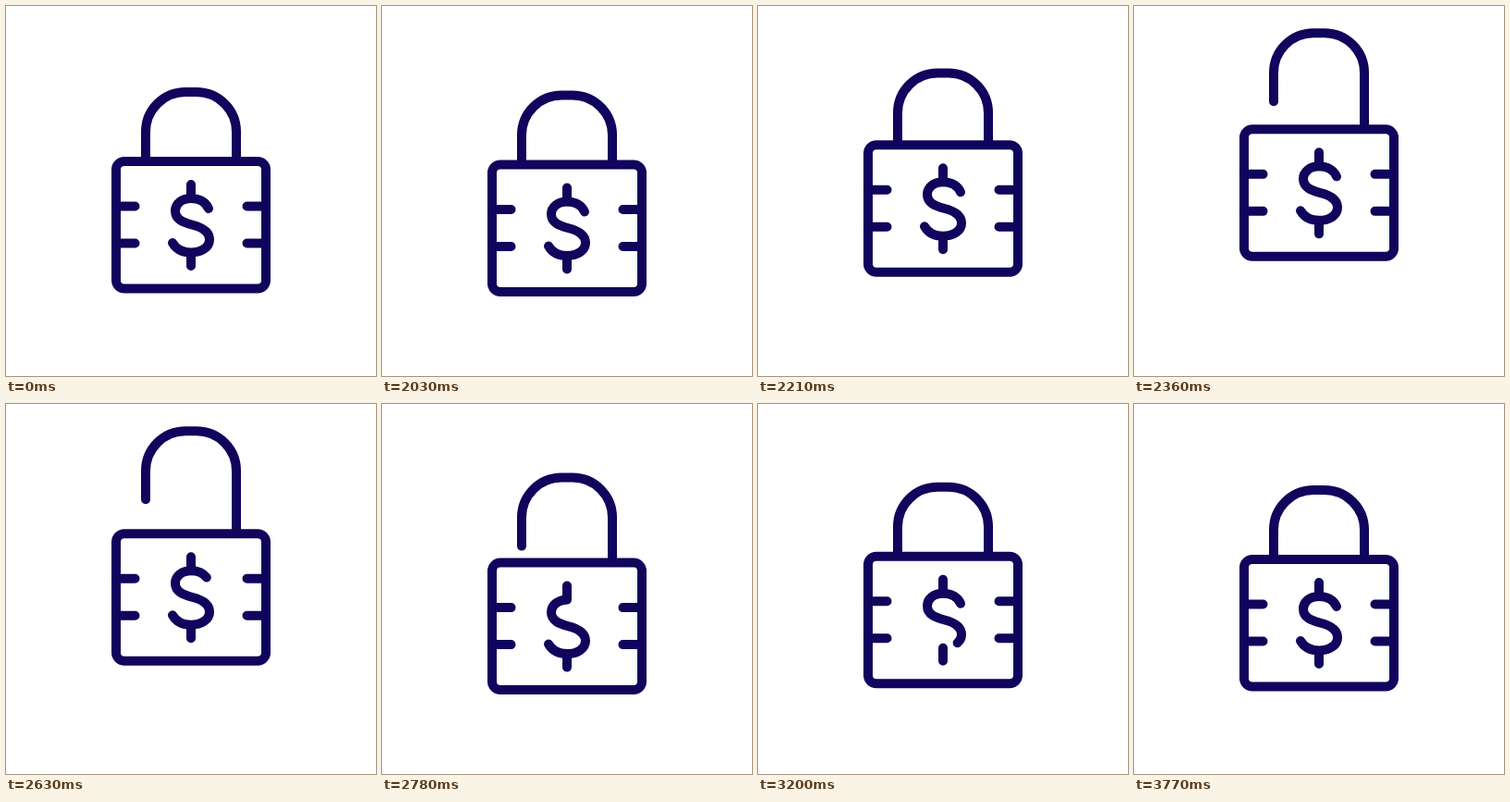
An HTML page that plays this animation: 400x400 px, repeating every 3890 ms.

```html
<!DOCTYPE html>
<html lang="en">
<head>
<meta charset="utf-8">
<title>Padlock</title>
<style>
  html, body { margin: 0; height: 100%; overflow: hidden; background: #fff; }
  svg { display: block; width: 100%; height: 100%; }
  g { fill: none; stroke: #10045c; stroke-width: 10; stroke-linecap: round; stroke-linejoin: round; }
</style>
</head>
<body>
<svg viewBox="0 0 400 400">
  <defs>
    <path id="curve" pathLength="1" d="M219 219C216 212 209 208 200 208C190 208 183 214 183 221.5C183 231 192 234 201 236.5C211 239 220 243 220 252.5C220 261 211 266.5 200 266.5C191 266.5 184 263 180 256"/>
  </defs>
  <g id="lock">
    <path id="shackle"/>
    <rect x="119" y="168" width="162" height="137.5" rx="9" fill="#fff"/>
    <path d="M119 216.5h20.5M119 256.5h20.5M281 216.5h-20.5M281 256.5h-20.5M200 193v15M200 267v14"/>
    <use id="leaving" href="#curve" stroke-dasharray="1.01 2"/>
    <use id="arriving" href="#curve"/>
  </g>
</svg>
<script>
const LOOP = 3890, STEP = 30;
const $ = id => document.getElementById(id);
const lock = $('lock'), shackle = $('shackle'), leaving = $('leaving'), arriving = $('arriving');

// Keys are [time in ms, value], with a sine ease between neighbours.
const bodyKeys = [[2000, 0], [2090, 14], [2290, -34.5], [2480, -35], [2545, -35], [2883, 14], [3241, -3.8], [3480, 0]];
const liftKeys = [[2160, 0], [2440, -36], [2630, -36], [2940, 4], [3200, 0]];
const drawKeys = [[2804, 0], [3284, .79], [3500, .82], [3770, 1]];

function tween(keys, t) {
  const i = keys.findIndex(key => key[0] > t);
  if (i === 0) return keys[0][1];
  if (i < 0) return keys[keys.length - 1][1];
  const [t0, a] = keys[i - 1], [t1, b] = keys[i];
  return a + (b - a) * (1 - Math.cos(Math.PI * (t - t0) / (t1 - t0))) / 2;
}

function show(el, on) {
  el.setAttribute('visibility', on ? 'visible' : 'hidden');
}

function render(t) {
  lock.setAttribute('transform', `translate(0 ${tween(bodyKeys, t)})`);

  // The right leg always reaches the body; the left one lifts out of it.
  const lift = tween(liftKeys, t);
  shackle.setAttribute('d', `M151 ${Math.min(167 + lift, 168)}V${136 + lift}a43 43 0 0 1 43-43h12a43 43 0 0 1 43 43V168`);

  const erased = Math.max(0, (t - 2540) / 650) ** 1.8;
  const drawn = tween(drawKeys, t);
  const fresh = t < 2540;
  show(leaving, fresh || erased < 1);
  leaving.setAttribute('stroke-dashoffset', -erased);
  show(arriving, drawn > 0);
  arriving.setAttribute('stroke-dasharray', `${drawn} 2`);
}

const start = performance.now();
function frame() {
  const t = (performance.now() - start) % LOOP;
  render(Math.floor((t + 10) / STEP) * STEP - 10);
  requestAnimationFrame(frame);
}
frame();
</script>
</body>
</html>
```
